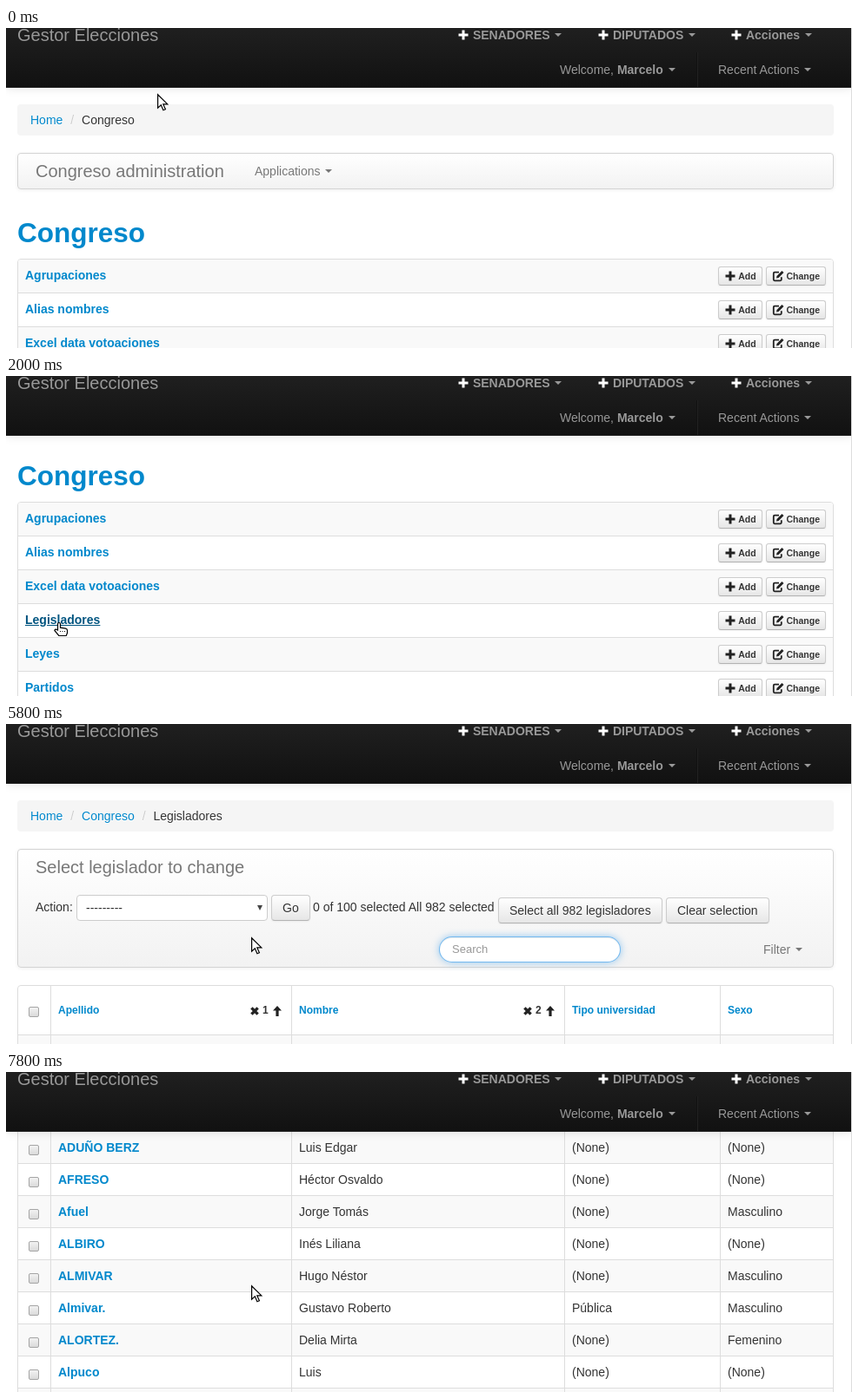
Animation, 973 px wide and 369 px high, one loop 8 s. Source, as an HTML page:

```html
<!DOCTYPE html>
<html lang="es">
<head>
<meta charset="utf-8">
<title>Congreso administration</title>
<style>
* { box-sizing: border-box; }
html, body { margin: 0; width: 100%; height: 100%; overflow: hidden; background: #fff; }
body { position: relative; font: 14px/20px "Liberation Sans", Arial, sans-serif; color: #333; }
a { color: #08c; }
svg { display: block; }

/* one 8 s clock, every change is a hard step */
.run { animation: 8s step-end infinite; }

.layer { position: absolute; inset: 0; overflow: hidden; background: #fff; }
.page { position: absolute; left: 13px; top: 0; width: 939px; height: 2000px; }
.page > *, .abs { position: absolute; white-space: nowrap; }

header { position: absolute; left: 0; top: 0; width: 100%; height: 69px; color: #999;
  background: linear-gradient(#222, #111) 0 -12px / 100% 81px; border-bottom: 1px solid #252525;
  box-shadow: 0 1px 10px rgba(0,0,0,.1); text-shadow: 0 -1px 0 rgba(0,0,0,.25); }
header span { position: absolute; white-space: nowrap; }
.title { font-size: 20px; }
.split { left: 794px; top: 28px; width: 2px; height: 40px; border-left: 1px solid #111; border-right: 1px solid #222; }
.edge { position: absolute; right: 0; top: 0; width: 1px; height: 100%; background: #ddd; }

.caret { display: inline-block; vertical-align: top; margin: 8px 0 0 2px;
  border: 4px solid transparent; border-top-color: currentColor; border-bottom: 0; }
.ico { display: inline-block; width: 14px; height: 14px; vertical-align: text-top; margin-top: 1px; }

.crumbs { top: 88px; width: 100%; height: 36px; padding: 8px 15px; border-radius: 4px;
  background: #f5f5f5; text-shadow: 0 1px 0 #fff; }
.crumbs i { font-style: normal; color: #ccc; padding: 0 5px; }
.nav { top: 144px; width: 100%; height: 42px; border: 1px solid #d4d4d4; border-radius: 4px; color: #777;
  background: linear-gradient(#fff, #f2f2f2); box-shadow: 0 1px 4px rgba(0,0,0,.065); text-shadow: 0 1px 0 #fff; }
.nav .name { left: 20px; top: 10px; font-size: 20px; }
h2 { margin: 0; top: 216px; font-size: 31.5px; line-height: 40px; color: #08c; }

.table { width: 100%; border: 1px solid #ddd; border-radius: 4px; overflow: hidden; }
.row { position: relative; border-bottom: 1px solid #ddd; }
.row.odd { background: #f9f9f9; }
.apps .row { height: 39px; padding: 8px; }
.apps .row span { position: absolute; right: 8px; top: 8px; height: 22px; }
.people .row { height: 37px; display: grid; grid-template-columns: 37px 277px 314px 179px 1fr; }
.people .row.head { height: 57px; }
.cell { position: relative; padding: 8px; }
.cell + .cell { border-left: 1px solid #ddd; }
.head .cell { padding-top: 18px; font-size: 12px; font-weight: bold; }
.check { position: absolute; left: 12px; top: 15px; width: 12px; height: 12px; border: 1px solid #a5a5a5;
  border-radius: 2px; background: linear-gradient(#f2f2f2, #dadada); }
.head .check { top: 24px; }
.sort { left: 228px; top: 18px; width: 40px; height: 20px; padding-left: 15px; }
.sort.b { left: 265px; }
.sort svg { position: absolute; top: 3px; left: -1px; width: 14px; height: 14px; }
.sort svg + svg { left: 25px; }

.btn { display: inline-block; height: 30px; padding: 4px 12px; border: 1px solid #ccc; border-bottom-color: #b3b3b3;
  border-radius: 4px; color: #333; background: linear-gradient(#fff, #e6e6e6); text-shadow: 0 1px 1px rgba(255,255,255,.75);
  box-shadow: inset 0 1px 0 rgba(255,255,255,.2), 0 1px 2px rgba(0,0,0,.05); }
.btn.mini { height: 22px; padding: 0 6px; font-weight: bold; font-size: 10.5px; border-radius: 3px; vertical-align: top; }
.mini .ico { margin-top: -1px; }
.select { left: 68px; top: 197px; width: 220px; height: 30px; padding: 4px 10px; background: #fff;
  border: 1px solid #ccc; border-radius: 4px; }
.select::after { content: ""; position: absolute; right: 5px; top: 11px; border: 3.5px solid transparent;
  border-top: 6px solid #444; border-bottom: 0; }
.search { left: 485px; top: 245px; width: 209px; height: 30px; padding: 4px 14px; border-radius: 15px; font-size: 13px;
  color: #999; background: #fff; border: 1px solid rgba(82,168,236,.8);
  box-shadow: inset 0 1px 1px rgba(0,0,0,.075), 0 0 8px rgba(82,168,236,.6); }

#cursor { position: absolute; left: 0; top: 0; }
#cursor svg { position: absolute; left: 0; top: 0; overflow: visible; }
#cursor .hand { left: -4px; top: -1px; }

#home { animation-name: home; }
#list { animation-name: list; }
#list .page { animation-name: listScroll; }
#list .nav { animation-name: grow; }
.late { animation-name: late; }
.right { animation-name: shift; }
.edge { animation-name: edge; }
.hot { animation-name: hot; }
#cursor { animation-name: move; }
.hand { animation-name: hand; }
.arrow { animation-name: arrow; }

@keyframes home {
  0% { transform: none; } 2.5% { transform: translateY(-6px); } 5% { transform: translateY(-50px); }
  6.25% { transform: translateY(-92px); } 7.5% { transform: translateY(-106px); }
  8.75% { transform: translateY(-114px); } 10% { transform: translateY(-119px); }
  11.25%, 100% { transform: translateY(-121px); }
}
@keyframes list {
  0% { visibility: hidden; clip-path: inset(0 764px 0 0); }
  61.25% { visibility: visible; clip-path: inset(0 764px 0 0); }
  65%, 100% { visibility: visible; clip-path: inset(0); }
}
@keyframes listScroll {
  0% { width: 954px; transform: none; } 72.5% { width: 939px; transform: none; }
  75% { width: 939px; transform: translateY(-66px); } 76.25% { width: 939px; transform: translateY(-132px); }
  78.75% { width: 939px; transform: translateY(-185px); } 81.25% { width: 939px; transform: translateY(-253px); }
  87.5% { width: 939px; transform: translateY(-306px); } 90% { width: 939px; transform: translateY(-424px); }
  93.75% { width: 939px; transform: translateY(-542px); }
  97.5%, 100% { width: 939px; transform: translateY(-660px); }
}
@keyframes grow { 0% { height: 47px; } 72.5%, 100% { height: 137px; } }
@keyframes late { 0% { opacity: 0; } 72.5%, 100% { opacity: 1; } }
@keyframes shift { 0% { transform: none; } 65% { transform: translateX(15px); } 72.5%, 100% { transform: none; } }
@keyframes edge { 0% { opacity: 1; } 65% { opacity: 0; } 72.5%, 100% { opacity: 1; } }
@keyframes hot {
  0% { color: #08c; text-decoration: none; }
  25%, 100% { color: #005580; text-decoration: underline; }
}
@keyframes move {
  0% { transform: translate(174px, 76px); } 2.5% { transform: translate(173px, 77px); }
  6.25% { transform: translate(173px, 78px); } 11.25% { transform: translate(173px, 80px); }
  13.75% { transform: translate(172px, 86px); } 15% { transform: translate(166px, 105px); }
  16.25% { transform: translate(150px, 140px); } 17.5% { transform: translate(128px, 190px); }
  18.75% { transform: translate(105px, 240px); } 20% { transform: translate(84px, 280px); }
  21.25% { transform: translate(70px, 300px); } 22.5% { transform: translate(64px, 304px); }
  23.75% { transform: translate(61px, 294px); } 25% { transform: translate(59px, 285px); }
  65%, 100% { transform: translate(282px, 246px); }
}
@keyframes hand {
  0%, 48.75%, 65%, 78.75%, 100% { opacity: 0; }
  25%, 51.25%, 75% { opacity: 1; }
}
@keyframes arrow {
  0%, 48.75%, 65%, 78.75%, 100% { opacity: 1; }
  25%, 51.25%, 75% { opacity: 0; }
}
</style>
</head>
<body>
<svg width="0" height="0" style="position:absolute">
  <symbol id="plus" viewBox="0 0 14 14"><path d="M5.5 1.5h3v4h4v3h-4v4h-3v-4h-4v-3h4z"/></symbol>
  <symbol id="edit" viewBox="0 0 14 14">
    <path d="M8 2.7H3q-1.2 0-1.2 1.2v7.2q0 1.2 1.2 1.2h6.6q1.2 0 1.2-1.2V8.2" fill="none" stroke="currentColor" stroke-width="1.8"/>
    <path d="M5 9.6l.5-2.7L11.4 1l2.1 2.1-5.9 5.9z"/>
  </symbol>
  <symbol id="cross" viewBox="0 0 14 14"><path d="M3.4 3.4l7.2 7.2M10.6 3.4l-7.2 7.2" stroke="currentColor" stroke-width="3.4"/></symbol>
  <symbol id="up" viewBox="0 0 14 14"><path d="M7 1l5 5.6H8.6V13H5.4V6.600H2z"/></symbol>
</svg>

<div class="layer">
  <div class="page run" id="home">
    <div class="crumbs"><a>Home</a> <i>/</i> Congreso</div>
    <div class="nav">
      <span class="abs name">Congreso administration</span>
      <span class="abs" style="left:272px;top:10px">Applications <b class="caret"></b></span>
    </div>
    <h2>Congreso</h2>
    <div class="table apps" id="apps" style="top:266px"></div>
  </div>
</div>

<div class="layer run" id="list">
  <div class="page run">
    <div class="crumbs"><a>Home</a> <i>/</i> <a>Congreso</a> <i>/</i> Legisladores</div>
    <div class="nav run"><span class="abs name">Select legislador to change</span></div>
    <div class="late run" style="inset:0">
      <span class="abs" style="left:21px;top:201px">Action:</span>
      <span class="abs select">---------</span>
      <span class="abs btn" style="left:292px;top:197px">Go</span>
      <span class="abs" style="left:340px;top:201px">0 of 100 selected All 982 selected</span>
      <span class="abs btn" style="left:553px;top:200px">Select all 982 legisladores</span>
      <span class="abs btn" style="left:746px;top:200px">Clear selection</span>
      <span class="abs search">Search</span>
      <span class="abs" style="left:858px;top:250px;color:#777">Filter <b class="caret"></b></span>
      <div class="abs table people" id="people" style="top:301px"></div>
    </div>
  </div>
</div>

<header>
  <span class="title" style="left:13px;top:-2px">Gestor Elecciones</span>
  <div class="right run" id="menu"><span class="split"></span></div>
</header>
<div class="edge run"></div>

<div id="cursor" class="run">
  <svg class="arrow run" width="13" height="20" fill="#fff" stroke="#000" stroke-width="1.2">
    <path d="M.6 .8V16.200l3.700-3.400 2.600 6 2.500-1.100-2.600-5.800h5z"/>
  </svg>
  <svg class="hand run" width="17" height="17" fill="#fff" stroke="#000" stroke-width="1.2">
    <path d="M4.500 9V2a1.500 1.500 0 0 1 3 0V6.200l6 .9q2 .4 2 2.200v3l-1.300 3.200H5.800L.9 9.500Q1.300 7 4.500 9z"/>
    <path d="M7 10.500h7" stroke-dasharray="1 1.500" stroke-width="1"/>
  </svg>
</div>

<script>
const $ = id => document.getElementById(id);
const icon = (id, color = '#222') =>
  `<svg class="ico" style="color:${color};fill:${color}"><use href="#${id}"/></svg>`;
const caret = '<b class="caret"></b>';

const menu = [
  [519, -2, 'SENADORES'], [680, -2, 'DIPUTADOS'], [833, -2, 'Acciones'],
  [637, 38, 'Welcome, <b>Marcelo</b>'], [819, 38, 'Recent Actions']
];
$('menu').innerHTML += menu.map(([x, y, text]) => {
  const label = y < 0 ? `${icon('plus', '#fff')} <b>${text}</b>` : text;
  return `<span style="left:${x}px;top:${y}px">${label} ${caret}</span>`;
}).join('');

const odd = i => i % 2 ? '' : ' odd';
const apps = ['Agrupaciones', 'Alias nombres', 'Excel data votoaciones', 'Legisladores', 'Leyes', 'Partidos'];
$('apps').innerHTML = apps.map((name, i) =>
  `<div class="row${odd(i)}"><b><a${i === 3 ? ' class="hot run"' : ''}>${name}</a></b>
   <span><b class="btn mini">${icon('plus')} Add</b> <b class="btn mini">${icon('edit')} Change</b></span></div>`
).join('');

// surname, first name, university type, sex
const people = `#00,LEGISLADOR A DESIGNAR
. Legislador A Designar,Nro. 2
Abos Pereda.,Luis Ignacio,P,M
ABENZO,Florencia
Abelar de Montefino,Marta Lorena,,F
Acuelos,Guillermo,P,M
ACORBELINO,Ricardo
Adornela.,Verónica,P,F
ADRIVO,Elena Sofía
ADUMEN,Pedro Luis
ADUÑO BERZ,Luis Edgar
AFRESO,Héctor Osvaldo
Afuel,Jorge Tomás,,M
ALBIRO,Inés Liliana
ALMIVAR,Hugo Néstor,,M
Almivar.,Gustavo Roberto,P,M
ALORTEZ.,Delia Mirta,,F
Alpuco,Luis
Alqueno,Rosa`.split('\n').map(line => line.split(','));
const words = { P: 'Pública', M: 'Masculino', F: 'Femenino' };
const word = key => words[key] || '(None)';
const row = (cls, cells) => `<div class="row${cls}">` +
  ['<i class="check"></i>', ...cells].map(c => `<div class="cell">${c}</div>`).join('') + '</div>';
const sort = (n, cls) => `<span class="abs sort ${cls}">${icon('cross')}${icon('up')}${n}</span>`;

$('people').innerHTML =
  row(' head', ['<a>Apellido</a>' + sort(1, ''), '<a>Nombre</a>' + sort(2, 'b'), '<a>Tipo universidad</a>', '<a>Sexo</a>']) +
  people.map(([last, first, type, sex], i) =>
    row(odd(i), [`<b><a>${last}</a></b>`, first, word(type), word(sex)])).join('');
</script>
</body>
</html>
```
